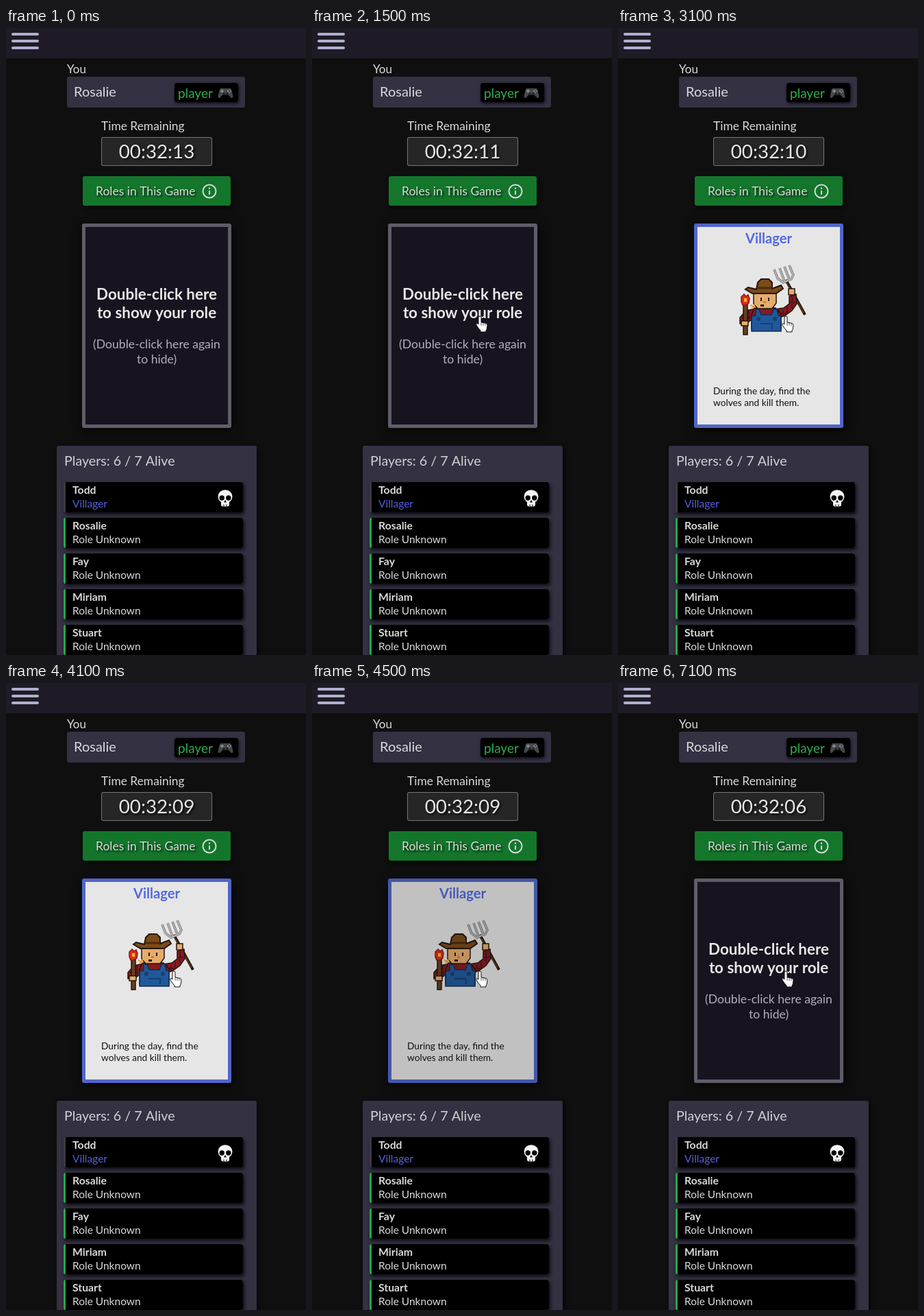
An HTML page with a canvas for the animation above (7.2 s loop, 438 px wide and 914 px high).

```html
<!DOCTYPE html>
<html lang="en">
<head>
<meta charset="utf-8">
<title>Role card</title>
<style>
  html, body { margin: 0; width: 100%; height: 100%; overflow: hidden; background: #0f0f10; }
  canvas { display: block; }
</style>
</head>
<body>
<canvas id="stage" width="438" height="914"></canvas>
<script>
const WIDTH = 438, HEIGHT = 914, LOOP = 7200, STEP = 100;
const TICKS = [500, 1500, 2600, 3600, 4600, 5600, 6700];
const PLAYERS = ['Todd', 'Rosalie', 'Fay', 'Miriam', 'Stuart'];
const LIGHT = '#d9d9d9', PANEL = '#333142';

const stage = document.getElementById('stage').getContext('2d');
let ctx = stage;

function layer(draw) {
  const canvas = document.createElement('canvas');
  canvas.width = WIDTH;
  canvas.height = HEIGHT;
  ctx = canvas.getContext('2d');
  draw();
  ctx = stage;
  return canvas;
}

function box(x, y, w, h, fill, radius = 0) {
  ctx.fillStyle = fill;
  ctx.beginPath();
  ctx.roundRect(x, y, w, h, radius);
  ctx.fill();
}

function text(string, x, y, size, color = LIGHT, align = 'left', weight = 400) {
  ctx.font = `${weight} ${size}px Lato, sans-serif`;
  ctx.textAlign = align;
  ctx.fillStyle = color;
  ctx.fillText(string, x, y);
}

function shadowed(x, y, blur, draw) {
  ctx.save();
  ctx.shadowColor = 'rgba(0,0,0,.75)';
  ctx.shadowOffsetX = x;
  ctx.shadowOffsetY = y;
  ctx.shadowBlur = blur;
  draw();
  ctx.restore();
}

function shape(d, fill, line, width = 1.5) {
  const path = new Path2D(d);
  if (fill) {
    ctx.fillStyle = fill;
    ctx.fill(path);
  }
  if (line) {
    ctx.strokeStyle = line;
    ctx.lineWidth = width;
    ctx.stroke(path);
  }
}

function dot(x, y, rx, fill, ry = rx) {
  ctx.fillStyle = fill;
  ctx.beginPath();
  ctx.ellipse(x, y, rx, ry, 0, 0, Math.PI * 2);
  ctx.fill();
}

function gamepad() {
  shape('M314 88h13q2 0 3 5l1.5 7q-.5 3-3 1.5l-4-4h-8l-4 4q-2.5 1.5-3-1.5l1.5-7q1-5 3-5z', '#45484c');
  shape('M313 92h5M315.5 89.5v5', null, '#92969a', 1.5);
  dot(318, 96, 1.8, '#202225');
  dot(323, 96, 1.8, '#202225');
  dot(326, 90, 1, '#c94a4a');
  dot(328, 92, 1, '#5a8ed0');
  dot(324, 92, 1, '#b9a54a');
  dot(326, 94, 1, '#4da36a');
}

function skull(x, y) {
  ctx.save();
  ctx.translate(x, y);
  dot(0, -2, 10.5, '#f4f4f4', 9.8);
  box(-6, 3, 12, 9.5, '#f4f4f4', 3);
  dot(-4.8, 0, 3.7, '#000');
  dot(4.8, 0, 3.7, '#000');
  shape('M0 3l2 3.5h-4z', '#000');
  shape('M-2 9.5v3M2 9.5v3', null, '#000', 1);
  ctx.restore();
}

function header() {
  box(0, 0, WIDTH, HEIGHT, '#0f0f10');
  box(0, 0, WIDTH, 44, '#1e1b26');
  for (let y = 7; y < 30; y += 10) box(8, y, 40, 4, '#b1afcd', 2);

  text('You', 89, 66, 17);
  box(89, 71, 260, 45, PANEL, 3);
  text('Rosalie', 99, 100, 20);
  shadowed(1, 2, 4, () => box(246, 80, 93, 28, '#000', 4));
  text('player', 251, 102, 19, '#2fae4b');
  gamepad();

  text('Time Remaining', 139, 149, 17.4);
  box(139, 159, 162, 42, '#767676', 3);
  box(140, 160, 160, 40, '#262626', 2);

  shadowed(2, 3, 6, () => box(112, 216, 216, 43, '#13762b', 3));
  shadowed(2, 2, 3, () => text('Roles in This Game', 131, 244, 17.5));
  shape('M306.5 238a9.5 9.5 0 1 1-19 0a9.5 9.5 0 1 1 19 0zM297 237v6', null, LIGHT, 2);
  box(296, 232.5, 2, 2.5, LIGHT);
}

function playerList() {
  shadowed(2, 3, 6, () => box(74, 609, 292, 320, PANEL, 3));
  text('Players: 6 / 7 Alive', 85, 638, 19.7, '#d0d0d3');
  PLAYERS.forEach((name, i) => {
    const y = 662 + i * 52, dead = i === 0;
    shadowed(2, 3, 5, () => box(84, y, 262, 44, dead ? '#3c3b42' : '#23aa45', 3));
    box(87, y, 259, 44, '#000', [0, 3, 3, 0]);
    text(name, 97, y + 17, 15.8, LIGHT, 'left', 700);
    text(dead ? 'Villager' : 'Role Unknown', 97, y + 37, 15.5, dead ? '#5660dc' : LIGHT);
    if (dead) skull(320, y + 23);
  });
}

function cardFrame(border, fill) {
  shadowed(2, 4, 16, () => box(111, 285, 218, 298, border, 3));
  box(116, 290, 208, 288, fill);
}

function cover() {
  cardFrame('#605d69', '#17141f');
  text('Double-click here', 220, 396, 22.4, '#e8e8e8', 'center', 700);
  text('to show your role', 220, 423, 22.4, '#e8e8e8', 'center', 700);
  text('(Double-click here again', 220, 467, 17.6, '#b1b0b9', 'center');
  text('to hide)', 220, 489, 17.6, '#b1b0b9', 'center');
}

function villager() {
  const ink = '#24150c', skin = '#e5ad6c', red = '#851b20', wood = '#65401f';
  // Pitchfork
  shape('M245 367L273 418', null, ink, 4);
  shape('M247 372L271 415', null, wood, 1.5);
  const fork = 'M228 352L233 365L241 371L253 366L256 360L250 346M236 350L243 369M243 348L250 366';
  shape(fork, null, '#777', 3.5);
  shape(fork, null, '#b5b5b5', 2);
  // Sleeves
  shape('M229 410L242 408L250 402L250 391L260 388L261 402L254 412L244 419L232 424z', red, ink);
  shape('M202 409L187 412L178 422L178 431L188 431L199 421z', red, ink);
  shape('M235 411v10M241 411v9M247 406v9M232 416h15M251 400h10M254 390v18M184 416v14M191 412v14M180 422h18', null, '#4b1016', 1.5);
  shape('M249 380h9v9h-9z', skin, ink);
  // Torch
  shape('M183 402h6v45h-6z', wood, ink);
  shape('M180 392l4-4 3 3 3-2 2 5-1 7-4 3h-5l-2-5z', '#df2c1c', '#8c1b12');
  shape('M184 394h4v5h-4z', '#ffb52c');
  shape('M180 427h10v7h-10z', skin, ink);
  // Overalls and head
  shape('M199 408H230L238 417V439H195V418z', red, ink);
  shape('M201 410h5l3 8h15l3-8h5l2 9 4 1v22H195v-22l6-1z', '#20589b', '#102c50');
  shape('M208 431h17v8', null, '#173f70', 2);
  dot(205, 424, 3, '#173f70');
  dot(229, 424, 3, '#173f70');
  shape('M198 386H231V401L225 409H204L198 402z', skin, ink);
  box(208, 393, 2, 5, ink);
  box(219, 393, 2, 5, ink);
  box(212, 398, 4, 3, '#c68445');
  box(208, 403, 5, 3, ink);
  shape('M193 404l7 3M195 409l5-6', null, '#eba33d', 2);
  // Hat
  shape('M202 381L204 371L209 366H220L225 371V380L238 375L241 380L231 387H196L186 381L190 378z', '#7b4b18', ink, 2);
  shape('M203 379H225', null, '#4b2a0c', 3);
}

function roleCard() {
  cardFrame('#5066c9', '#e6e6e6');
  text('Villager', 220, 314, 20.2, '#526adf', 'center', 700);
  villager();
  text('During the day, find the', 139, 534, 13.7, '#111');
  text('wolves and kill them.', 139, 551, 13.7, '#111');
}

const page = layer(() => { header(); playerList(); });
const coverCard = layer(cover);
const openCard = layer(roleCard);

const ease = p => {
  p = Math.min(1, Math.max(0, p));
  return p * p * (3 - 2 * p);
};
const fade = (t, start) => ease((t - start) / 250);

function drawFaded(image, alpha) {
  stage.globalAlpha = Math.max(0, alpha);
  stage.drawImage(image, 0, 0);
  stage.globalAlpha = 1;
}

function pointer(t) {
  if (t < 100) return;
  const p = ease((t - 100) / 1300);
  const x = 440 - 194 * p, y = 560 - 140 * p;
  const overCard = x < 329;
  ctx.save();
  ctx.translate(x, y);
  shape(overCard
    ? 'M-3 2a2 2 0 0 1 4 0v7l7 1.5q2 .6 2 3l-.6 4.5q-.4 2-1.4 3v2h-8v-2q-3-3-6-8q-1-2 1-2.5l2 1.5z'
    : 'M0 0v17l4-4 3 7 3-1-3-7h5z', '#fff', '#111', 1);
  if (overCard) shape('M1 9v5M4 10v4M7 11v3', null, '#333', 0.8);
  ctx.restore();
}

function render(now) {
  const t = Math.floor((now % LOOP) / STEP) * STEP;
  const seconds = 13 - TICKS.filter(tick => t >= tick).length;
  const shown = fade(t, 2080) - fade(t, 4455);

  ctx.drawImage(page, 0, 0);
  shadowed(2, 2, 3, () =>
    text('00:32:' + String(seconds).padStart(2, '0'), 220, 190, 27.8, '#e6e6e6', 'center'));
  // One side fades out fully before the other fades in.
  drawFaded(coverCard, 1 - 2 * shown);
  drawFaded(openCard, 2 * shown - 1);
  pointer(t);
}

const start = performance.now();
function loop() {
  render(performance.now() - start);
  requestAnimationFrame(loop);
}
loop();
</script>
</body>
</html>
```
